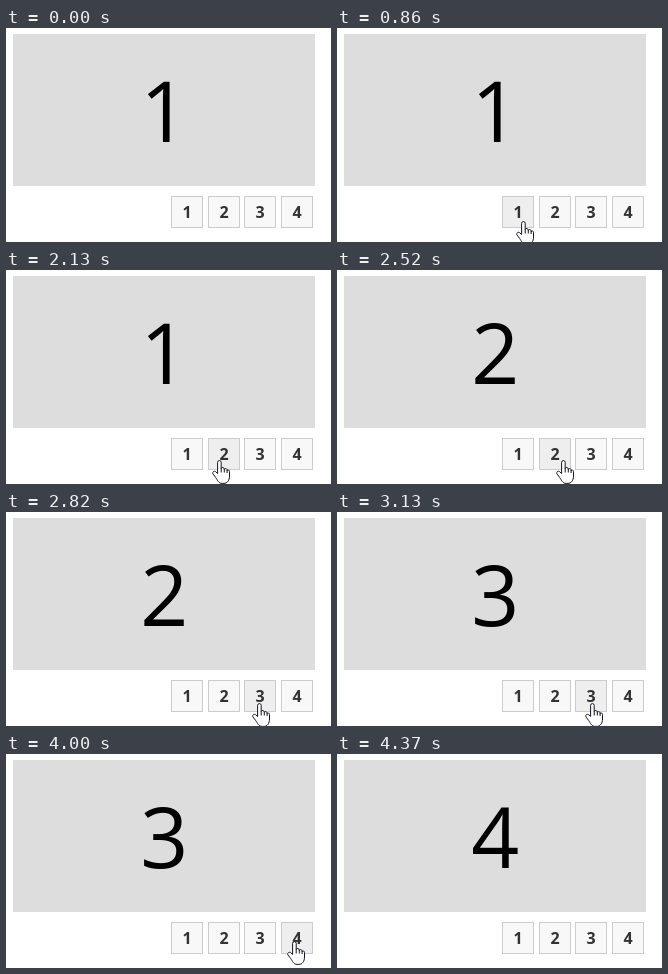
Animation, 325 px wide and 214 px high, one loop 4.77 s. Source, as an HTML page:

```html
<!DOCTYPE html>
<html lang="en">
<head>
<meta charset="utf-8">
<title>Slider pager</title>
<style>
html, body { margin: 0; width: 100%; height: 100%; overflow: hidden; background: #fff }
svg { display: block; width: 325px; height: 214px }
text { font-family: "Open Sans", "Noto Sans", sans-serif; text-anchor: middle }
#slide { font-size: 84px }
#pager text { font-size: 16px; font-weight: 700; fill: #333 }
#pager rect { fill: #f8f8f8; stroke: #ccc }
#pager .hover rect { fill: #eee }
#hand { fill: #fff; stroke: #14141f; stroke-linejoin: round }
</style>
</head>
<body>
<svg viewBox="0 0 325 214">
  <rect x="7" y="6" width="302" height="152" fill="#ddd"/>
  <text id="slide" x="158.3" y="114">1</text>
  <g id="pager"></g>
  <g id="hand">
    <path d="M5.6 13.5V2.4a1.8 1.8 0 0 1 3.6 0V8.6c0-1.6 3.1-1.4 3.1.4V9.6c0-1.5 2.8-1.3 2.8.4V10.8c0-1.4 2.4-1.2 2.4.8V16c0 4.5-2.3 7.4-5.6 7.4H10C6.5 23.4 5.5 20 3.6 17.4L1 14C-.2 12 2.2 10.4 3.8 11.8Z"/>
    <path d="M9.2 8.5v4M12.3 9.5v3M15.1 10.5v2.5" fill="none"/>
  </g>
</svg>
<script>
const LOOP = 4770;
const STEP = 78;              // the picture advances in steps of this many ms
const SIZE = 32, TOP = 168;
const clicks = [2200, 3050, 4060];
const buttonX = i => Math.round(165 + i * 110 / 3);

// Pointer moves: it eases to (x, y) between the two times.
const ENTER = 702, LEAVE = 4368;
const origin = { x: 197, y: 209 };
const moves = [
  { from: 620, to: 940, x: 175, y: 190 },
  { from: 1420, to: 1990, x: 206, y: 190 },
  { from: 2270, to: 2880, x: 248, y: 191 },
  { from: 3250, to: 3640, x: 281, y: 187 },
  { from: 4180, to: LEAVE, x: 287, y: 212 }
];

const slide = document.getElementById('slide');
const hand = document.getElementById('hand');
const pager = document.getElementById('pager');

pager.innerHTML = [0, 1, 2, 3].map(i =>
  `<g><rect x="${buttonX(i) + .5}" y="${TOP + .5}" width="${SIZE - 1}" height="${SIZE - 1}"/>` +
  `<text x="${buttonX(i) + SIZE / 2}" y="190">${i + 1}</text></g>`).join('');
const buttons = [...pager.children];

function pointer(t) {
  let { x, y } = origin;
  for (const m of moves) {
    const p = Math.min(1, Math.max(0, (t - m.from) / (m.to - m.from)));
    const ease = p * p * (3 - 2 * p);
    x += (m.x - x) * ease;
    y += (m.y - y) * ease;
  }
  return { x: Math.round(x), y: Math.round(y) };
}

function draw(t) {
  slide.textContent = 1 + clicks.filter(c => c <= t).length;

  const now = Math.floor(t / STEP) * STEP;
  const shown = now >= ENTER && now < LEAVE;
  const { x, y } = pointer(now);
  hand.style.display = shown ? '' : 'none';
  hand.setAttribute('transform', `translate(${x} ${y})`);

  buttons.forEach((button, i) => {
    const dx = x + 7 - buttonX(i);
    button.classList.toggle('hover', shown && dx >= 0 && dx < SIZE && y < TOP + SIZE);
  });
}

const start = performance.now();
(function tick() {
  draw((performance.now() - start) % LOOP);
  requestAnimationFrame(tick);
})();
</script>
</body>
</html>
```
